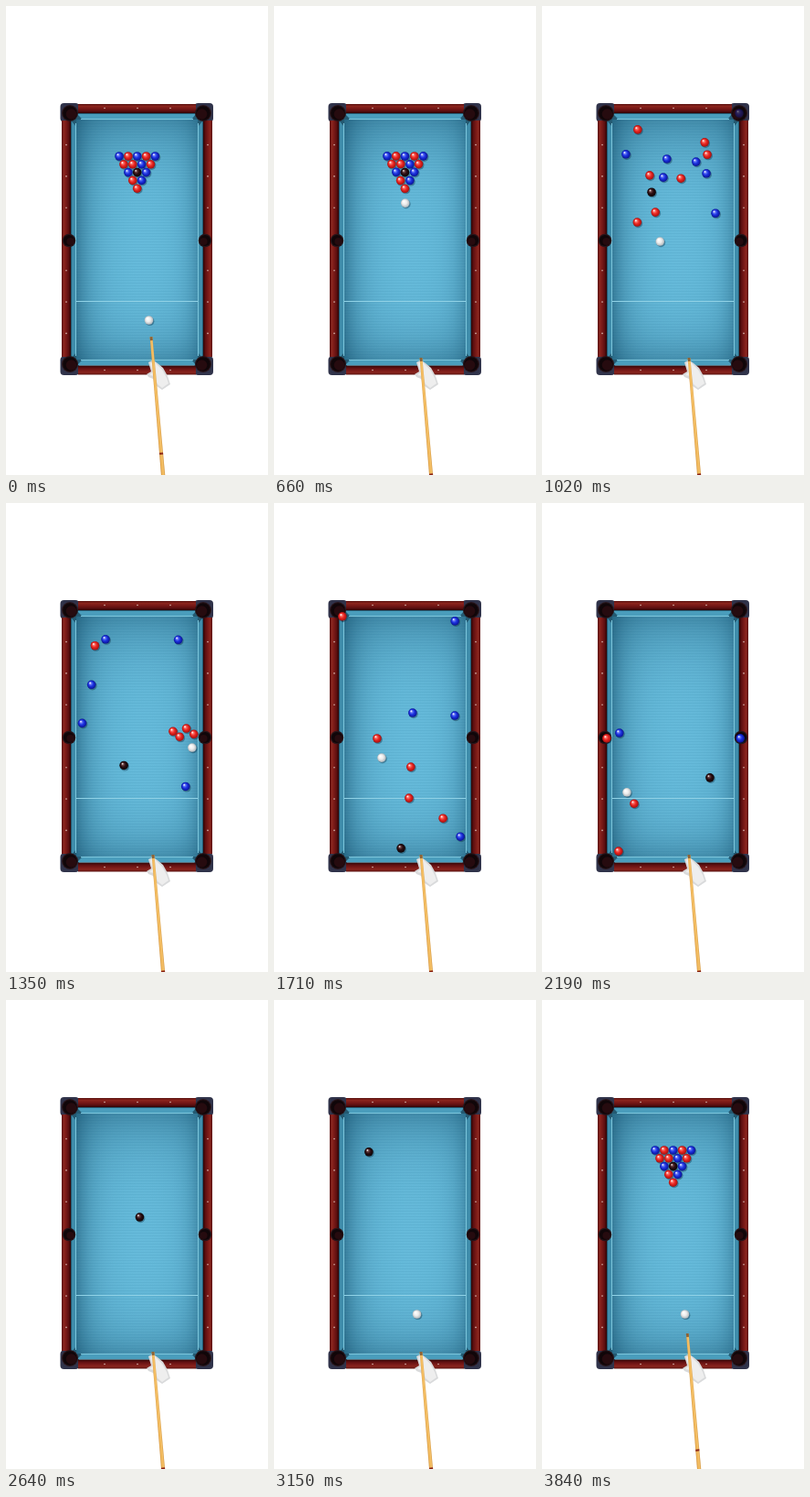
Animation, 287 px wide and 512 px high, one loop 3900 ms. Source, as an HTML page with a canvas:

```html
<!DOCTYPE html>
<html lang="en">
<head>
<meta charset="utf-8">
<title>Pool table</title>
<style>
html, body { margin: 0; width: 100%; height: 100%; overflow: hidden; background: #fff; }
canvas { display: block; width: 287px; height: 512px; }
</style>
</head>
<body>
<canvas id="stage" width="287" height="512"></canvas>
<script>
const W = 287, H = 512, LOOP = 3900;
const PULL = 430, STRIKE = 470, BREAK = 660, RESPOT = 2950, RESET = 3600;
const DROP_SPEED = .22;
const TONES = {
  R: ['#ffa49c', '#ec2823', '#9c0d0d'],
  B: ['#96a6ff', '#1d33e2', '#080f8c'],
  K: ['#8d6262', '#2c0e12', '#090304'],
  W: ['#ffffff', '#ebebeb', '#aab2b7']
};
const bed = [[82, 206], [128, 382]];
const spot = [156.5, 343];
const pockets = [117, 256, 391].flatMap(y => y === 256 ? [[69, y], [218, y]] : [[70, y], [216, y]]);

// Legs of the roll: end time and usual pace in px per ms
const legs = [
  { end: 1020, pace: .3 },
  { end: 1710, pace: .24 },
  { end: 2190, pace: .18 },
  { end: 3150, pace: .16 }
];

// Where each racked ball is at the end of its legs; then it rolls to the nearest pocket.
const rows = ['BRBRB', 'RRBR', 'BKB', 'RB', 'R'];
const stops = [
  [[92, 162]],
  [[105, 135]],
  [[137, 167], [198, 129]],
  [[178, 149]],
  [],
  [[118, 185], [75, 124]],
  [[152, 188], [148, 322], [84, 380]],
  [[169, 170], [152, 229], [85, 251]],
  [[181, 162], [185, 344]],
  [[133, 187]],
  [[120, 203], [139, 377], [184, 300], [104, 166]],
  [[180, 183], [198, 232], [217, 257]],
  [[104, 236], [113, 257], [71, 257]],
  [[190, 226], [204, 364]],
  [[124, 225], [150, 288], [101, 328]]
];

const clamp = k => Math.max(0, Math.min(1, k));
const mix = (a, b, k) => a + (b - a) * k;
const between = (a, b, k) => [mix(a[0], b[0], k), mix(a[1], b[1], k)];
const distance = (a, b) => Math.hypot(a[0] - b[0], a[1] - b[1]);
const onBed = p => p.every((v, axis) => v >= bed[axis][0] && v <= bed[axis][1]);

// Picks the straight or one-cushion route whose length best suits the pace.
function route(from, to, length) {
  const options = [{ aim: to }];
  if (onBed(to)) {
    bed.forEach((walls, axis) => walls.forEach((wall, side) => {
      const aim = [...to];
      aim[axis] = 2 * wall - to[axis];
      options.push({ aim, axis, wall, sign: side ? 1 : -1 });
    }));
  }
  const misfit = o => Math.abs(distance(from, o.aim) - length);
  return options.reduce((best, o) => misfit(o) < misfit(best) ? o : best);
}

function makeBall(tone, home, points) {
  const path = [];
  let from = home, start = BREAK;
  points.forEach((to, i) => {
    const { end, pace } = legs[i];
    path.push({ from, start, end, ...route(from, to, pace * (end - start)) });
    from = to;
    start = end;
  });
  const pocket = pockets.reduce((a, b) => distance(from, b) < distance(from, a) ? b : a);
  const drop = start + distance(from, pocket) / DROP_SPEED;
  path.push({ from, start, end: drop, aim: pocket });
  return { tone, home, path, drop };
}

function locate(ball, t) {
  const leg = ball.path.find(l => t <= l.end) || ball.path[ball.path.length - 1];
  const p = between(leg.from, leg.aim, clamp((t - leg.start) / (leg.end - leg.start)));
  if (leg.sign && (p[leg.axis] - leg.wall) * leg.sign > 0) p[leg.axis] = 2 * leg.wall - p[leg.axis];
  return p;
}

const balls = [];
rows.forEach((row, r) => [...row].forEach((tone, c) => {
  const home = [143.7 + (c - (row.length - 1) / 2) * 9.85, 164 + r * 8.8];
  balls.push(makeBall(TONES[tone], home, stops[balls.length]));
}));
const cueBall = makeBall(TONES.W, [144, 215], [[129, 257], [118, 278], [93, 316]]);

const ctx = document.getElementById('stage').getContext('2d');

function disc(g, x, y, r, fill) {
  g.fillStyle = fill;
  g.beginPath();
  g.arc(x, y, r, 0, Math.PI * 2);
  g.fill();
}

function box(g, x, y, w, h, fill) {
  g.fillStyle = fill;
  g.fillRect(x, y, w, h);
}

function poly(g, points, fill) {
  g.fillStyle = fill;
  g.beginPath();
  points.forEach(p => g.lineTo(p[0], p[1]));
  g.closePath();
  g.fill();
}

function ramp(g, x0, y0, x1, y1, colours) {
  const r = g.createLinearGradient(x0, y0, x1, y1);
  colours.forEach((c, i) => r.addColorStop(i / (colours.length - 1), c));
  return r;
}

// Shadow that fades quickly from both ends towards the middle
function shade(g, x1, y1, first, last) {
  const steps = Array.from({ length: 21 }, (_, i) => {
    const k = i / 20;
    const a = first * Math.pow(1 - k, 7) + last * Math.pow(k, 9);
    return `rgba(14,70,98,${a.toFixed(3)})`;
  });
  box(g, 77, 124, 133, 262, ramp(g, x1 ? 77 : 0, y1 ? 124 : 0, x1, y1, steps));
}

function drawTable(g) {
  for (const x of [59.5, 206.5]) {
    for (const y of [106, 382.5]) {
      g.fillStyle = '#30334a';
      g.beginPath();
      g.roundRect(x, y, 20.5, 20.5, 4);
      g.fill();
    }
  }
  const wood = ['#5a1210', '#8a241d', '#771917', '#5e0f10', '#2e0506'];
  box(g, 61, 125, 10, 258, ramp(g, 61, 0, 71, 0, wood));
  box(g, 216, 125, 10, 258, ramp(g, 226, 0, 216, 0, wood));
  box(g, 79, 107, 129, 10, ramp(g, 0, 107, 0, 117, wood));
  box(g, 79, 392.5, 129, 10, ramp(g, 0, 402.5, 0, 392.5, wood));

  // Cushions
  box(g, 71, 117, 145, 275.5, '#245a72');
  poly(g, [[78, 118], [208, 118], [203, 124], [84, 124]], '#4a9dbc');
  poly(g, [[78, 392], [208, 392], [203, 386], [84, 386]], '#4a9dbc');
  poly(g, [[72, 126], [77, 132], [77, 378], [72, 384]], '#3f8dab');
  poly(g, [[215, 126], [210, 132], [210, 378], [215, 384]], '#3f8dab');

  // Cloth
  box(g, 77, 124, 133, 262, '#66bbdb');
  shade(g, 210, 0, .52, .36);
  shade(g, 0, 386, .4, .36);
  for (let y = 125; y < 386; y += 3) box(g, 77, y, 133, 1, 'rgba(20,90,125,.08)');
  for (const x of [76, 210]) box(g, x, 128, 1, 254, '#7cc6dc');
  for (const y of [123, 386]) box(g, 82, y, 123, 1, '#7cc6dc');
  box(g, 77, 322, 133, 1, '#90d2e6');

  // Sights
  const sight = '#d8b9b0';
  for (let i = -3; i <= 3; i++) {
    if (!i) continue;
    for (const x of [66, 221]) disc(g, x, 254.5 + i * 34.3, .8, sight);
  }
  for (let x = 108; x < 200; x += 36) {
    for (const y of [111.5, 397.5]) disc(g, x, y, .8, sight);
  }

  for (const [x, y] of pockets) {
    const r = y === 256 ? 7.3 : 9;
    disc(g, x, y, r, '#29151a');
    disc(g, x, y, r - 1.2, '#100609');
    disc(g, x + (x < 143 ? 1.5 : -1.5), y + 1, r - 3.2, '#260b0f');
  }
}

function drawHand(g) {
  poly(g, [[156, 389], [161, 386.5], [166, 390], [172, 395], [177, 404], [180, 413], [171, 419],
    [165, 415], [161, 407], [156, 405], [154, 402], [159, 399]], '#d9dadb');
  poly(g, [[158, 390], [162, 388], [166, 392], [171, 397], [176, 406], [178, 412], [171, 417],
    [166, 413], [163, 404], [157, 403], [161, 399]], '#eeeeee');
}

function drawBall([x, y], tone, alpha = 1) {
  ctx.globalAlpha = alpha;
  disc(ctx, x + 1, y + 1.2, 4.9, 'rgba(8,40,60,.38)');
  const body = ctx.createRadialGradient(x - 1.5, y - 1.7, .3, x, y, 5);
  tone.forEach((c, i) => body.addColorStop(i / 2, c));
  disc(ctx, x, y, 4.8, body);
  disc(ctx, x - 1.5, y - 1.8, .9, 'rgba(255,255,255,.75)');
  ctx.globalAlpha = 1;
}

function drawRolling(ball, t) {
  const alpha = 1 - clamp((t - ball.drop) / 60);
  if (alpha > 0) drawBall(locate(ball, t), ball.tone, alpha);
}

// Draw back, strike, recoil; step up to the ball again after the reset.
function cueTip(t) {
  if (t >= RESET) return mix(384, 364, clamp((t - RESET) / 150));
  if (t < PULL) return mix(361, 384, t / PULL);
  if (t < STRIKE) return mix(384, 348, (t - PULL) / (STRIKE - PULL));
  return mix(348, 384, clamp((t - STRIKE) / 120));
}

function drawCue(t) {
  const y = cueTip(t);
  ctx.save();
  ctx.translate(161 + (y - 384) * 11 / 127, y);
  ctx.rotate(-Math.atan2(11, 127));
  const stick = (a, b, fill) => {
    const half = d => 1.4 + d * .005;
    poly(ctx, [[-half(a), a], [half(a), a], [half(b), b], [-half(b), b]], fill);
  };
  stick(0, 160, ramp(ctx, -2.2, 0, 2.2, 0, ['#cf8f3c', '#f2ba5c', '#f4c068', '#d2953f']));
  stick(0, 4, '#8a6238');
  stick(127, 129, '#8a2418');
  ctx.restore();
}

const table = document.createElement('canvas');
table.width = W;
table.height = H;
const back = table.getContext('2d');
box(back, 0, 0, W, H, '#fff');
drawTable(back);
drawHand(back);

function draw(t) {
  ctx.drawImage(table, 0, 0);
  for (const ball of balls) {
    if (t >= RESET) drawBall(ball.home, ball.tone);
    else drawRolling(ball, t);
  }
  if (t < BREAK) {
    const k = clamp((t - STRIKE) / (BREAK - STRIKE));
    drawBall(between(spot, cueBall.home, k), cueBall.tone);
  } else if (t < RESPOT) drawRolling(cueBall, t);
  else drawBall(spot, cueBall.tone);
  drawCue(t);
}

const begin = performance.now();
function tick() {
  draw((performance.now() - begin) % LOOP);
  requestAnimationFrame(tick);
}
tick();
</script>
</body>
</html>
```
